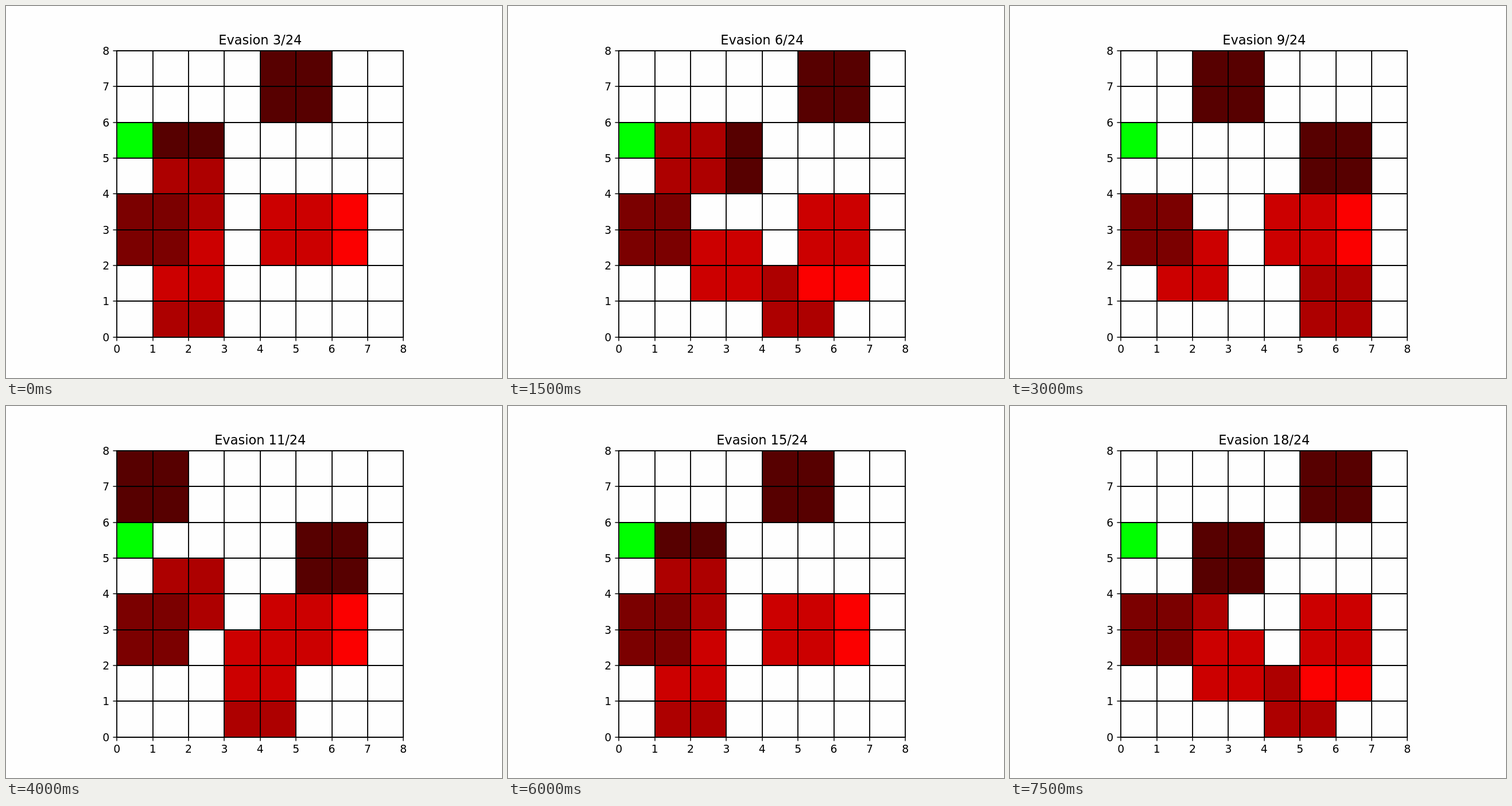
An HTML page that plays this animation: 864x648 px, repeating every 8000 ms.

```html
<!DOCTYPE html>
<html lang="en">
<head>
<meta charset="utf-8">
<title>Evasion</title>
<style>
  html, body { margin: 0; width: 100%; height: 100%; overflow: hidden; background: #fefefe; }
  svg { display: block; width: 864px; height: 648px; }
  text { font-family: "DejaVu Sans", Verdana, sans-serif; font-size: 18.75px; fill: #000; }
  #title { font-size: 22.5px; }
  line { stroke: #000; }
</style>
</head>
<body>
<svg id="stage" viewBox="0 0 864 648"></svg>
<script>
const STEP = 500, STEPS = 16, FIRST = 3, TOTAL = 24;
const SIZE = 8, CELL = 62.37, LEFT = 193.32, BOTTOM = 576.72;

// Patrols in paint order: colour, moving axis, fixed coordinate, low, high, step at low
const PATROLS = [
  ["#570000", "x", 6, 0, 6, 11],
  ["#570000", "x", 4, 0, 6, 4],
  ["#ad0000", "x", 0, 0, 6, 2],
  ["#ad0000", "y", 1, 1, 5, 9],
  ["#fb0000", "y", 5, 1, 3, 2],
  ["#cc0000", "x", 1, 0, 3, 2],
  ["#cc0000", "x", 2, 3, 6, 4],
  ["#7b0000", "x", 2, 0, 0, 0]
];
const DODGE = [4, 5, 16, 17]; // steps in which the runner stands one row higher

const stage = document.getElementById("stage");
const px = i => Math.round(LEFT + i * CELL);
const py = j => Math.round(BOTTOM - j * CELL);

function add(tag, attrs, text) {
  const el = document.createElementNS("http://www.w3.org/2000/svg", tag);
  for (const key in attrs) el.setAttribute(key, attrs[key]);
  if (text !== undefined) el.textContent = text;
  return stage.appendChild(el);
}

function line(x1, y1, x2, y2, width) {
  add("line", { x1, y1, x2, y2, "stroke-width": width });
}

function place(el, x, y, n) {
  el.setAttribute("x", px(x));
  el.setAttribute("y", py(y + n));
  el.setAttribute("width", px(x + n) - px(x));
  el.setAttribute("height", py(y) - py(y + n));
}

function bounce(n, low, high, start) {
  const span = 2 * (high - low);
  if (!span) return low;
  const d = (n - start + 2 * TOTAL) % span;
  return low + Math.min(d, span - d);
}

const blocks = PATROLS.map(([fill]) => add("rect", { fill }));
const runner = add("rect", { fill: "#00ff00" });

for (let i = 0; i <= SIZE; i++) {
  const x = px(i), y = py(i);
  line(x, py(0) + 1, x, py(SIZE) - 1, 1.875);
  line(px(0) - 1, y, px(SIZE) + 1, y, 1.875);
  line(x, py(0), x, py(0) + 6.56, 1.5);
  line(px(0) - 6.56, y, px(0), y, 1.5);
  add("text", { x: LEFT + i * CELL, y: 603.7, "text-anchor": "middle" }, i);
  add("text", { x: 180.2, y: BOTTOM - i * CELL + 7, "text-anchor": "end" }, i);
}
const title = add("text", { id: "title", x: 442.8, y: 66.5, "text-anchor": "middle" });

function draw(n) {
  PATROLS.forEach(([, axis, fixed, low, high, start], k) => {
    const p = bounce(n, low, high, start);
    if (axis === "x") place(blocks[k], p, fixed, 2);
    else place(blocks[k], fixed, p, 2);
  });
  place(runner, 0, DODGE.includes(n) ? 6 : 5, 1);
  title.textContent = `Evasion ${n}/${TOTAL}`;
}

const began = performance.now();
let shown = -1;
function tick() {
  const n = FIRST + Math.floor((performance.now() - began) / STEP) % STEPS;
  if (n !== shown) draw(shown = n);
  requestAnimationFrame(tick);
}
tick();
</script>
</body>
</html>
```
